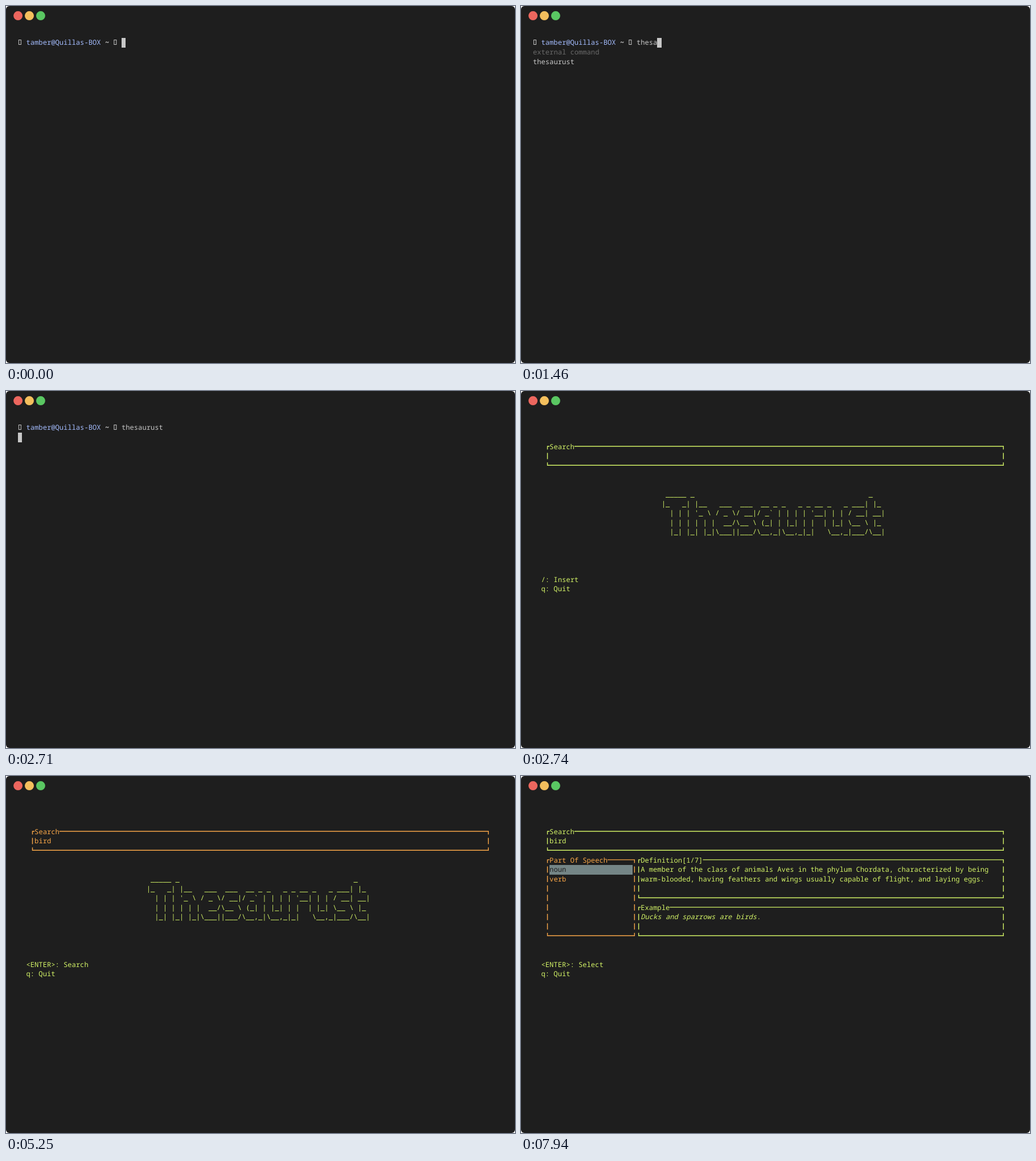
Recreate the animation shown at these times as an HTML page. Size 894 px wide and 626 px high, loop 8000 ms.

```html
<!DOCTYPE html>
<html lang="en">
<head>
<meta charset="utf-8">
<title>Terminal thesaurus</title>
<style>
html, body { margin: 0; width: 100%; height: 100%; overflow: hidden; background: #fff; }
svg { display: block; width: 894px; height: 626px; }
text { font: 500 12.133px "Noto Sans Mono", "DejaVu Sans Mono", monospace; white-space: pre; text-rendering: geometricPrecision; }
text.italic { font-style: italic; }
text.bold { font-weight: 700; }
</style>
</head>
<body>
<svg viewBox="0 0 894 626">
  <rect width="894" height="626" rx="6" fill="#1e1e1e"/>
  <circle cx="21.1" cy="17.1" r="8" fill="#ec665e"/>
  <circle cx="41" cy="17.1" r="8" fill="#f4bf5d"/>
  <circle cx="60.9" cy="17.1" r="8" fill="#5ac762"/>
  <g id="screen"></g>
</svg>
<script>
const LOOP = 8000;
const CELL_W = 7.28, CELL_H = 16.64, LEFT = 21, MIDDLE = 64.1, BASELINE = 68.4;
const LIME = '#d2f266', ORANGE = '#f9a748', GREY = '#c7c7c7', DIM = '#696969', BLUE = '#a3bbfc', BACK = '#1e1e1e';
const PROMPT = 'tamber@Quillas-BOX';
const COMMAND = 'thesaurust';
const commandTimes = [940, 990, 1110, 1370, 1460, 1630, 1850, 2140, 2280, 2390];
const wordTimes = [4570, 4780, 4970, 5250];
const BANNER = String.raw`
 _____ _                                          _
|_   _| |__   ___  ___  __ _ _   _ _ __ _   _ ___| |_
  | | | '_ \ / _ \/ __|/ _${'`'} | | | | '__| | | / __| __|
  | | | | | |  __/\__ \ (_| | |_| | |  | |_| \__ \ |_
  |_| |_| |_|\___||___/\__,_|\__,_|_|   \__,_|___/\__|`.slice(1).split('\n');

const colX = col => LEFT + col * CELL_W;
const rowY = row => MIDDLE + row * CELL_H;
const escapeText = s => s.replace(/&/g, '&amp;').replace(/</g, '&lt;');
const typed = (word, times, t) => word.slice(0, times.filter(at => t >= at).length);

function text(col, row, value, color, style = '') {
  return `<text class="${style}" xml:space="preserve" x="${colX(col)}" y="${BASELINE + row * CELL_H}" fill="${color}">${escapeText(value)}</text>`;
}

// Filled cells sit on whole pixels.
function block(col, row, cols, color) {
  const x = Math.round(colX(col)), width = Math.round(colX(col + cols)) - x;
  return `<rect x="${x}" y="${Math.round(rowY(row) - 8.2)}" width="${width}" height="17" fill="${color}"/>`;
}

function tofu(col) {
  return `<rect x="${colX(col) + 1.4}" y="59.5" width="4" height="8" fill="none" stroke="${GREY}"/>`;
}

// Borders keep the gaps that line spacing leaves between box-drawing characters.
function box(left, top, right, bottom, title, color) {
  const x1 = colX(left + .5), x2 = colX(right + .5);
  const y1 = rowY(top) - .4, y2 = rowY(bottom) - .4;
  let d = `M${x1} ${y1 + 5.5}V${y1}H${colX(left + 1)}`
    + `M${colX(left + 1 + title.length)} ${y1}H${x2}V${y1 + 5.5}`
    + `M${x1} ${y2 - 5}V${y2}H${x2}V${y2 - 5}`;
  for (let row = top + 1; row < bottom; row++) {
    for (const x of [x1, x2]) d += `M${x} ${rowY(row) - 5.5}v11`;
  }
  return `<path d="${d}" fill="none" stroke="${color}" stroke-width="1.4"/>` + text(left + 1, top, title, color);
}

function shell(t) {
  const command = typed(COMMAND, commandTimes, t);
  const running = t >= 2710;
  let out = tofu(0) + text(2, 0, PROMPT, BLUE) + text(21, 0, '~', '#e6e6e6', 'bold') + tofu(23) + text(25, 0, command, GREY);
  out += running ? block(0, 1, 1, GREY) : block(25 + command.length, 0, 1, GREY);
  if (t >= 1040 && !running) {
    const [kind, match] = t < 1370 ? ['reserved word', 'then'] : ['external command', COMMAND];
    out += text(0, 1, kind, DIM) + text(0, 2, match, GREY);
  }
  return out;
}

function results(selecting) {
  const accent = selecting ? ORANGE : LIME;
  return box(3, 5, 24, 13, 'Part Of Speech', accent)
    + block(4, 6, 20, '#748586') + text(4, 6, 'noun', BACK) + text(4, 7, 'verb', accent)
    + box(25, 5, 113, 9, 'Definition[1/7]', LIME)
    + text(26, 6, 'A member of the class of animals Aves in the phylum Chordata, characterized by being', LIME)
    + text(26, 7, 'warm-blooded, having feathers and wings usually capable of flight, and laying eggs.', LIME)
    + box(25, 10, 113, 13, 'Example', LIME)
    + text(26, 11, 'Ducks and sparrows are birds.', LIME, 'italic');
}

function app(t) {
  const editing = t >= 4110 && t < 6630, found = t >= 6630, selecting = t >= 7940;
  const accent = editing ? ORANGE : LIME;
  const help = selecting ? '<ENTER>: Select'
    : found ? 'j, k: Change part of speech; /: Insert'
    : editing ? '<ENTER>: Search' : '/: Insert';
  return box(3, 2, 113, 4, 'Search', accent)
    + text(4, 3, typed('bird', wordTimes, t), accent)
    + (found ? results(selecting) : BANNER.map((line, i) => text(31, 7 + i, line, LIME)).join(''))
    + text(2, 16, help, LIME) + text(2, 17, 'q: Quit', LIME);
}

const screenGroup = document.getElementById('screen');
let shown;
function render(t) {
  const markup = t < 2740 ? shell(t) : app(t);
  if (markup !== shown) screenGroup.innerHTML = shown = markup;
}

const start = performance.now();
function tick() {
  render((performance.now() - start) % LOOP);
  requestAnimationFrame(tick);
}
tick();
</script>
</body>
</html>
```
